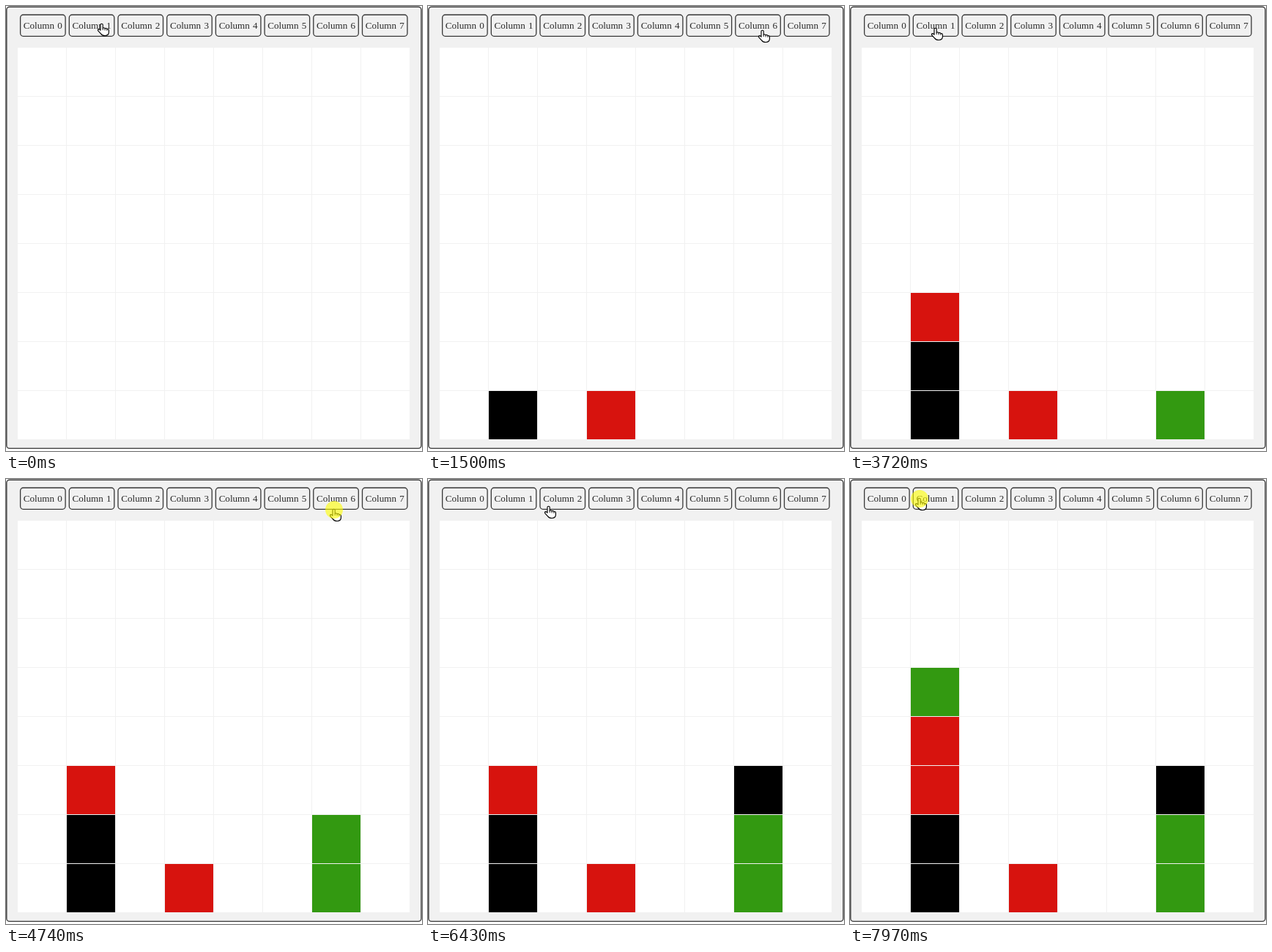
An HTML page for the animation above (8000 ms loop, 568 px wide and 608 px high).

```html
<!DOCTYPE html>
<html lang="en">
<head>
<meta charset="utf-8">
<title>Column drop</title>
<style>
html, body { margin: 0; width: 100%; height: 100%; overflow: hidden; background: #fff; }
svg { display: block; }
text { font: 13.1px "Liberation Serif", serif; word-spacing: 1px; fill: #2a2a2a; text-anchor: middle; }
</style>
</head>
<body>
<svg width="568" height="608" viewBox="0 0 568 608">
  <rect x=".8" y="1.2" width="566.2" height="603.2" rx="4" fill="#f1f1f1" stroke="#383838" stroke-width="1.4"/>
  <g id="buttons" fill="#f1f1f1" stroke="#383838" stroke-width="1.3"></g>
  <g id="labels"></g>
  <g id="board" fill="#fff"></g>
  <g id="tiles"></g>
  <g id="cursor" stroke="#000" stroke-linejoin="round" fill="#fff">
    <g id="hand" stroke-width="1.15">
      <path d="M-2 8.2V.8A1.6 1.6 0 0 1 1.2 .8V5.4Q3 3.9 4.1 5.8Q6 4.6 6.9 6.7Q9.2 5.9 9.4 8.4V10.8C9.4 14 7.4 15.5 4 15.5C1.2 15.5 -.4 14.5 -1.5 12.9L-5.2 8.9Q-6 7.2 -4.6 6.6Q-3.2 6.5 -2 8.2Z"/>
      <path d="M1.2 5.4V8M4.1 5.8V8.4M6.9 6.7V8.8" fill="none" stroke-width=".9"/>
    </g>
    <path id="arrow" d="M0 0V16L3.7 12.5L6.2 18.2L8.4 17.2L6 11.6H11Z"/>
  </g>
  <circle id="flash" r="12" fill="#ff0" fill-opacity=".6"/>
</svg>
<script>
const LOOP = 8000, STEP = 70;
const SIZE = 8, LEFT = 16, TOP = 57, PITCH = 67, CELL = 66;
const BUTTON = { x: 19.6, y: 12, width: 61.5, height: 29.3, pitch: 66.7 };
const COLORS = ["#000", "#d7130e", "#339911"];

// Each turn: when the cursor leaves, when it clicks, and where
const TURNS = [
  [70, 330, 133, 13],
  [660, 1010, 250, 28],
  [1080, 1630, 457, 34],
  [1970, 2520, 129, 30],
  [2790, 3650, 117, 31],
  [4050, 4740, 448, 42],
  [5010, 5550, 448, 33],
  [6080, 6840, 113, 29],
  [7370, 7970, 95, 27]
].map(([leave, click, x, y]) => ({ leave, click, x, y }));

const $ = id => document.getElementById(id);
const show = (el, on) => el.setAttribute("visibility", on ? "visible" : "hidden");

function add(parent, tag, attrs) {
  const el = document.createElementNS("http://www.w3.org/2000/svg", tag);
  for (const key in attrs) el.setAttribute(key, attrs[key]);
  return $(parent).appendChild(el);
}

function addCell(parent, col, row, attrs) {
  const box = { x: LEFT + PITCH * col, y: TOP + PITCH * row, width: CELL, height: CELL };
  return add(parent, "rect", { ...box, ...attrs });
}

for (let i = 0; i < SIZE; i++) {
  const { pitch, width, y, height } = BUTTON;
  const x = BUTTON.x + pitch * i;
  add("buttons", "rect", { x, y, width, height, rx: 4 });
  add("labels", "text", { x: x + width / 2, y: 31 }).textContent = "Column " + i;
  for (let row = 0; row < SIZE; row++) addCell("board", i, row);
}

// The click position picks the column; tiles stack and colours take turns
const heights = Array(SIZE).fill(0);
let from = { x: 131, y: 25 };
TURNS.forEach((turn, i) => {
  const col = Math.floor((turn.x - LEFT) / PITCH);
  const row = SIZE - 1 - heights[col]++;
  turn.tile = addCell("tiles", col, row, { fill: COLORS[i % COLORS.length] });
  turn.from = from;
  turn.distance = Math.hypot(turn.x - from.x, turn.y - from.y);
  turn.steps = Math.round((160 + 1.15 * turn.distance) / STEP);
  from = turn;
});

function cursorAt(t) {
  const turn = TURNS.findLast(({ leave }) => t >= leave);
  if (!turn) return TURNS[0].from;
  const done = Math.floor((t - turn.leave) / STEP) + 1;
  const u = Math.min(1, done / turn.steps);
  const s = u * u * (3 - 2 * u);
  const dip = 0.05 * turn.distance * Math.sin(Math.PI * s);
  return {
    x: Math.round(turn.from.x + (turn.x - turn.from.x) * s),
    y: Math.round(turn.from.y + (turn.y - turn.from.y) * s + dip)
  };
}

function overButton({ x, y }) {
  const offset = (x - BUTTON.x) % BUTTON.pitch;
  return Math.abs(y - 27) <= 16 && offset >= 0 && offset <= BUTTON.width;
}

function draw(t) {
  const pos = cursorAt(t);
  const place = `translate(${pos.x} ${pos.y})`;
  const hand = overButton(pos);
  $("cursor").setAttribute("transform", place);
  $("flash").setAttribute("transform", place);
  show($("hand"), hand);
  show($("arrow"), !hand);
  show($("flash"), TURNS.some(({ click }) => t >= click && t < click + STEP));
  for (const { tile, click } of TURNS) show(tile, t >= click);
}

const origin = performance.now();
function tick() {
  draw((performance.now() - origin) % LOOP);
  requestAnimationFrame(tick);
}
tick();
</script>
</body>
</html>
```
